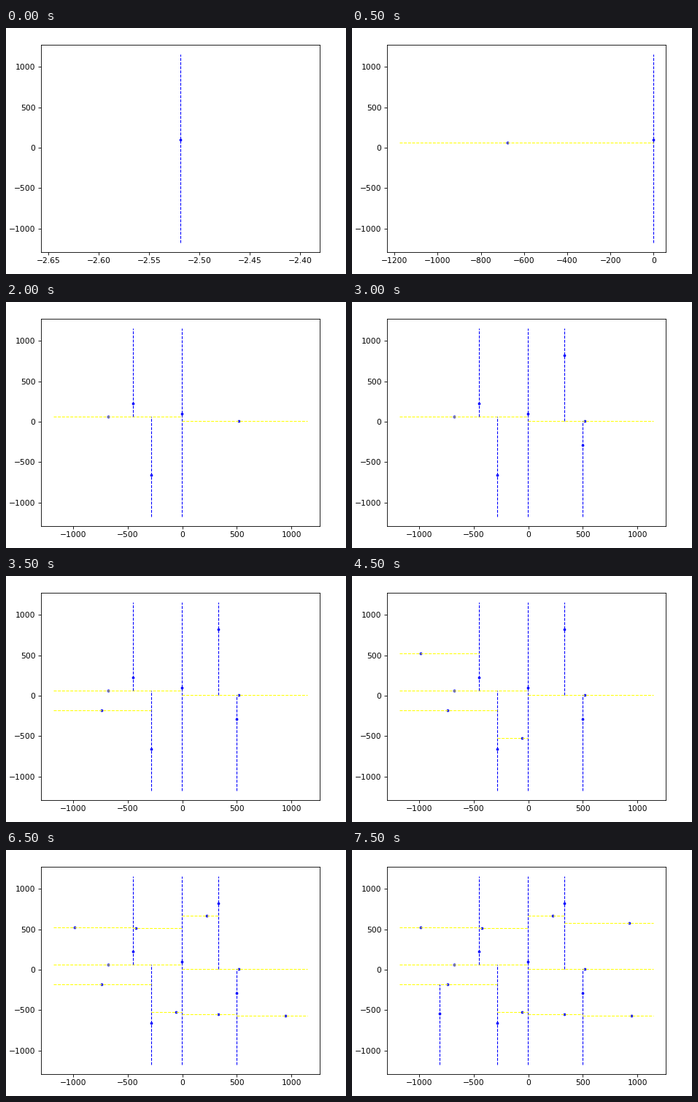
Recreate the animation shown at these times as a matplotlib script. Size 466x337 px, loop 8000 ms.

```python
import matplotlib.pyplot as plt
from matplotlib.animation import FuncAnimation

W, H, DPI = 466, 337, 77
EPS = 0.01  # keeps the pixel size from being truncated
LEFT, RIGHT, LOW, HIGH = -1176, 1142, -1177, 1159
ROOT = -2.519

# Splits of a k-d tree: axis, point, extent of the dividing line
SPLITS = [
    ("v", ROOT, 104, LOW, HIGH),
    ("h", -677, 62, LEFT, ROOT),
    ("h", 514, 5, ROOT, RIGHT),
    ("v", -284, -656, LOW, 62),
    ("v", -450, 230, 62, HIGH),
    ("v", 497, -292, LOW, 5),
    ("v", 333, 824, 5, HIGH),
    ("h", -738, -177, LEFT, -284),
    ("h", -57, -525, -284, ROOT),
    ("h", -985, 529, LEFT, -450),
    ("h", -424, 520, -450, ROOT),
    ("h", 333, -552, ROOT, 497),
    ("h", 945, -570, 497, RIGHT),
    ("h", 224, 668, ROOT, 333),
    ("h", 925, 578, 333, RIGHT),
    ("v", -808, -543, LOW, -177),
]

plt.rcParams["font.family"] = "DejaVu Sans"
fig = plt.figure(figsize=((W + EPS) / DPI, (H + EPS) / DPI), dpi=DPI)
ax = fig.add_axes([48 / W, 30 / H, 382 / W, 284 / H])


def draw_split(axis, x, y, start, end):
    ax.plot(x, y, "b.", ms=5)
    if axis == "v":
        ax.plot([x, x], [start, end], "b--", lw=1)
    else:
        ax.plot([start, end], [y, y], "--", color="yellow", lw=1)


def update(i):
    # Autoscaling widens the x axis as the first splits arrive
    ax.clear()
    for split in SPLITS[:i + 1]:
        draw_split(*split)
    return []


anim = FuncAnimation(fig, update, frames=len(SPLITS), init_func=lambda: [],
                     interval=500, repeat=True, repeat_delay=0)
plt.show()
```
